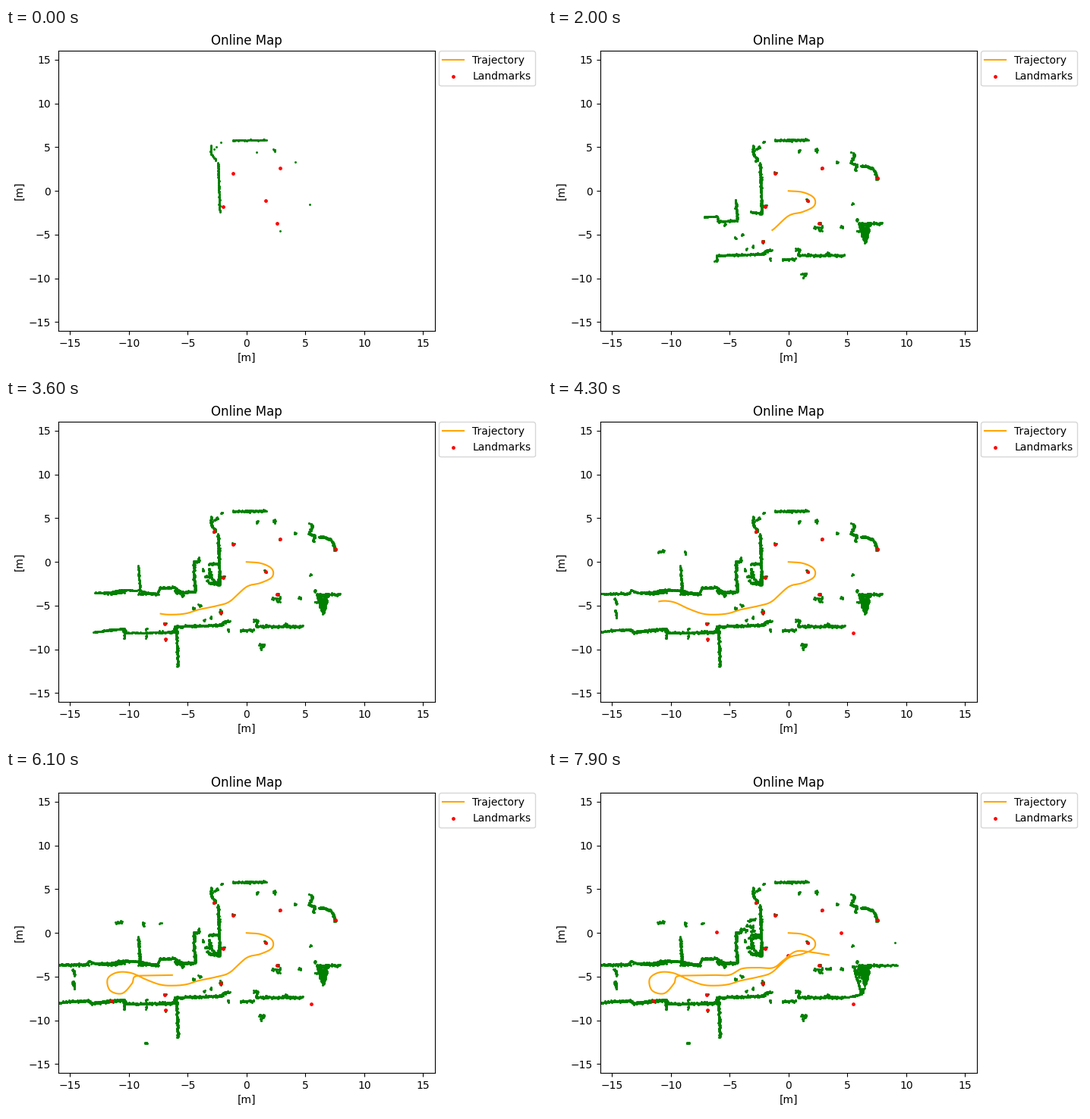
These frames come from a looping animation (706 by 453 pixels, 8 s). A matplotlib script:

```python
import numpy as np
import matplotlib.pyplot as plt
from matplotlib.animation import FuncAnimation

W, H, DPI, FRAMES = 706, 453, 100, 80
PX = np.array([32 / 496, 32 / 369.6])  # one pixel in data units
RANGE = 6.08  # how far the scanner sees, in metres
rng = np.random.default_rng(7)

# Waypoints of the drive, grouped into legs that end at a given time step
legs = {
    0: [(0, 0)],
    8: [(1.15, -0.13), (2, -0.6), (2.28, -1.2), (2.07, -1.85)],
    20: [(1.15, -2.42), (0, -2.85), (-1.38, -4.48)],
    36: [(-2.4, -4.98), (-4, -5.43), (-5.1, -5.88), (-6.2, -6.02), (-7.3, -5.92)],
    43: [(-8.5, -5.35), (-9.8, -4.58), (-11, -4.52)],
    61: [(-11.8, -5.25), (-11.6, -6.57), (-10.58, -6.92), (-9.74, -5.8),
         (-9.5, -5), (-8.5, -4.87), (-6.32, -4.82)],
    79: [(-5, -4.8), (-3.95, -4.08), (-2.6, -3.97), (-1.3, -3.98),
         (-0.45, -3.15), (0.6, -2.12), (1.8, -2.17), (3.42, -2.53)],
}
SUB = 14  # curve samples between waypoints


def spline(p):
    """Catmull-Rom curve through the points p."""
    q = np.vstack([2 * p[0] - p[1], p, 2 * p[-1] - p[-2]])
    u = (np.arange(SUB) / SUB)[:, None]
    out = []
    for a, b, c, d in zip(q, q[1:], q[2:], q[3:]):
        out.append(b + 0.5 * u * (c - a + u * (2 * a - 5 * b + 4 * c - d + u * (3 * (b - c) + d - a))))
    return np.vstack(out + [p[-1:]])


path = spline(np.array([p for leg in legs.values() for p in leg], float))
dist = np.r_[0, np.cumsum(np.hypot(*np.diff(path, axis=0).T))]
stops = (np.cumsum([len(leg) for leg in legs.values()]) - 1) * SUB
steps = np.arange(FRAMES)
travel = np.interp(steps, list(legs), dist[stops])
robot = np.column_stack([np.interp(travel, dist, path[:, j]) for j in (0, 1)])

cloud = []  # blocks of (x, y, birth)


def add(pts, after, delay):
    """Points show once the robot comes into range, not earlier than `after`."""
    gap = np.linalg.norm(pts[:, None] - robot[None], axis=2)
    seen = (gap < RANGE) & (steps >= after)
    birth = np.where(seen.any(axis=1), seen.argmax(axis=1), FRAMES)
    cloud.append(np.column_stack([pts, birth + delay]))


def wall(after, *xy):
    """A thin first scan of a polyline, thickened by later scans."""
    p = np.reshape(xy, (-1, 2))
    d = np.r_[0, np.cumsum(np.hypot(*(np.diff(p, axis=0) / PX).T))]
    s = np.linspace(0, d[-1], int(1.3 * d[-1]) + 2)
    pts = np.column_stack([np.interp(s, d, p[:, j]) for j in (0, 1)])
    for spread, wait in [(0.4, 0), (0.9, 9)]:
        noise = np.clip(rng.normal(0, spread, pts.shape), -1.8 * spread, 1.8 * spread)
        add(pts + noise * PX, after, rng.exponential(1, len(s)) * wait)


def clump(after, *spots):
    """Small objects, each a handful of hits."""
    for spot in spots:
        pts = np.array(spot) + rng.normal(0, 0.9, (7, 2)) * PX
        add(pts, after, 1.5 * np.arange(7))


def fill(after, n, *corners):
    """Hits scattered over a triangle."""
    add(rng.dirichlet([0.8] * 3, n) @ np.array(corners), after, rng.uniform(0, 10, n))


def clutter(after, n, x0, x1, y0, y1):
    """Clumps strewn over a box."""
    clump(after, *rng.uniform((x0, y0), (x1, y1), (n, 2)))


# Rooms around the start
wall(0, -3.02, 5.2, -3, 4.3, -2.6, 3.5)
wall(0, -2.42, 3.2, -2.28, -2.4)
wall(0, -1.15, 5.78, 1.65, 5.85)
wall(0, 2.28, 4.75, 2.45, 4.55)
wall(0, 5.3, 4.55, 5.65, 4.3, 5.3, 3.2, 5.75, 3, 5.65, 2.35)
wall(0, 6.15, 2.9, 7.2, 2.6, 7.55, 1.4)
wall(0, 5.95, -3.72, 9.2, -3.68)
wall(0, 6, -3.7, 6.2, -4.9, 6.55, -5.8)
wall(0, 0.6, -6.7, 0.9, -6.7, 0.8, -7.35, 5, -7.35, 6.2, -7, 6.4, -6.3)
wall(3, 2.2, -4.2, 2.5, -4.15)
clump(0, (-2.7, 4.85), (-2.5, 4.95), (-2.1, 5.6), (0.9, 4.58), (4.1, 3.25),
      (5.45, -1.5), (2.67, -4.55), (-2.3, -1.7), (5.8, -3.25), (5.9, -4.55), (8.95, -1.2))
clump(3, (4.5, -4.1), (2.8, -4.1), (3.35, -7.1))
fill(9, 170, (6, -3.75), (7, -3.75), (6.55, -6))

# Passage to the corridor
wall(10, -4.5, -1, -4.35, -3.4, -6, -3.45)
wall(10, -3.2, -2.4, -2.3, -2.6)
wall(10, -1.45, -6.75, -2, -6.85, -2.1, -7.2, -6.1, -7.38)
wall(10, -0.5, -7.85, 0.6, -7.75)
wall(10, 1.1, -9.5, 1.5, -9.4, 1.2, -10)
clump(13, (-4.55, -5.35), (-4, -4.95), (-3.6, -6.7), (-3.05, -6.35), (-1.6, -7.75), (-5.45, -3.8))

# Corridor, near half
wall(20, -6, -3.45, -6.05, -2.9, -7.4, -2.95, -7.55, -3.6, -9.2, -3.63)
wall(20, -6.1, -7.4, -6.1, -8, -7.7, -8.05)
wall(24, -4.05, 0.5, -4.1, 0.05, -4.45, 0.05, -4.45, -1)
wall(24, -3.2, -0.2, -2.35, -0.2)
wall(24, -3.2, -0.8, -3, -1.8, -2.5, -2.6, -2.3, -1.7)
wall(24, -5.98, -7.5, -5.82, -11.9)
wall(28, -10.4, -3.4, -11.2, -3.6, -12.6, -3.5)
wall(28, -10.4, -8.7, -10.4, -7.65, -11.7, -7.75, -12.7, -8)
clump(24, (-8.55, -7.7), (-8.5, -8.5), (-4.45, -5.25), (-2.2, -5.6))
clutter(24, 5, -3.7, -2.6, -2.2, -0.4)

# Corridor, far half
wall(36, -4.4, -3.4, -5.3, -3.5, -6, -3.1)
wall(36, -9.2, -0.5, -9.05, -3.3, -7.6, -3.75)
wall(36, -9, -3.25, -10.9, -3.2, -11.5, -3.5, -12.9, -3.5, -13.4, -3.2, -13.5, -3.6, -16.2, -3.65)
wall(36, -6.2, -8.05, -10.2, -8.1, -10.4, -7.65, -13.2, -8.05, -13.4, -7.75, -15, -7.8, -16.2, -8.05)
wall(36, -14.8, -4.1, -14.6, -4.8)
wall(36, -14.75, -5.5, -14.6, -6.4)
wall(36, -11.1, 1.15, -10.6, 1.25)
wall(36, -8.8, 1.25, -8.75, 0.8)
wall(36, -8.65, -12.6, -8.42, -12.58)
clump(36, (-7.35, 1.2))

# Second visit to the rooms
wall(64, -3.4, -0.6, -2.4, -0.4)
wall(64, -3.4, 1.35, -2.85, 1.5)
wall(73, 3.15, -4.1, 3.6, -4.1)
clutter(64, 7, -4, -2.8, 0.2, 1.6)
fill(64, 250, (5.3, -3.75), (7, -3.75), (6.4, -6.2))
wall(64, 5.6, -4.4, 6.15, -6.7)

# Landmarks as (birth, x, y)
marks = np.array([
    (0, -1.15, 2.05), (0, 2.87, 2.65), (0, -1.97, -1.78), (0, 1.6, -1.13), (0, 2.62, -3.7),
    (4, 7.55, 1.45), (18, -2.15, -5.75), (25, -2.75, 3.47), (31, -6.95, -7.12), (32, -6.87, -8.83),
    (41, 5.5, -8.1), (50, -11.5, -7.77), (66, -6.1, 0.07), (70, -0.03, -2.6), (74, 4.47, 0)])
clump(3, *marks[:10, 1:])
cloud = np.vstack(cloud)

fig = plt.figure(figsize=(W / DPI, H / DPI), dpi=DPI, facecolor="white")
ax = fig.add_axes([68.8 / W, 53 / H, 496 / W, 369.6 / H])
ax.set(xlim=(-16, 16), ylim=(-16, 16), xlabel="[m]", ylabel="[m]", title="Online Map")
ax.set_xticks(range(-15, 16, 5))
ax.set_yticks(range(-15, 16, 5))
scan = ax.scatter([], [], s=1.3, c="green")
line, = ax.plot([], [], color="orange", label="Trajectory")
dots = ax.scatter([], [], s=6, c="red", label="Landmarks")
ax.legend(loc="upper left", bbox_to_anchor=(1.01, 1), borderaxespad=0)


def draw(i):
    scan.set_offsets(cloud[cloud[:, 2] <= i, :2])
    dots.set_offsets(marks[marks[:, 0] <= i, 1:])
    line.set_data(*np.vstack([path[dist < travel[i]], robot[i]]).T)
    return scan, line, dots


anim = FuncAnimation(fig, draw, frames=FRAMES, interval=100, repeat=True, repeat_delay=0)
plt.show()
```
